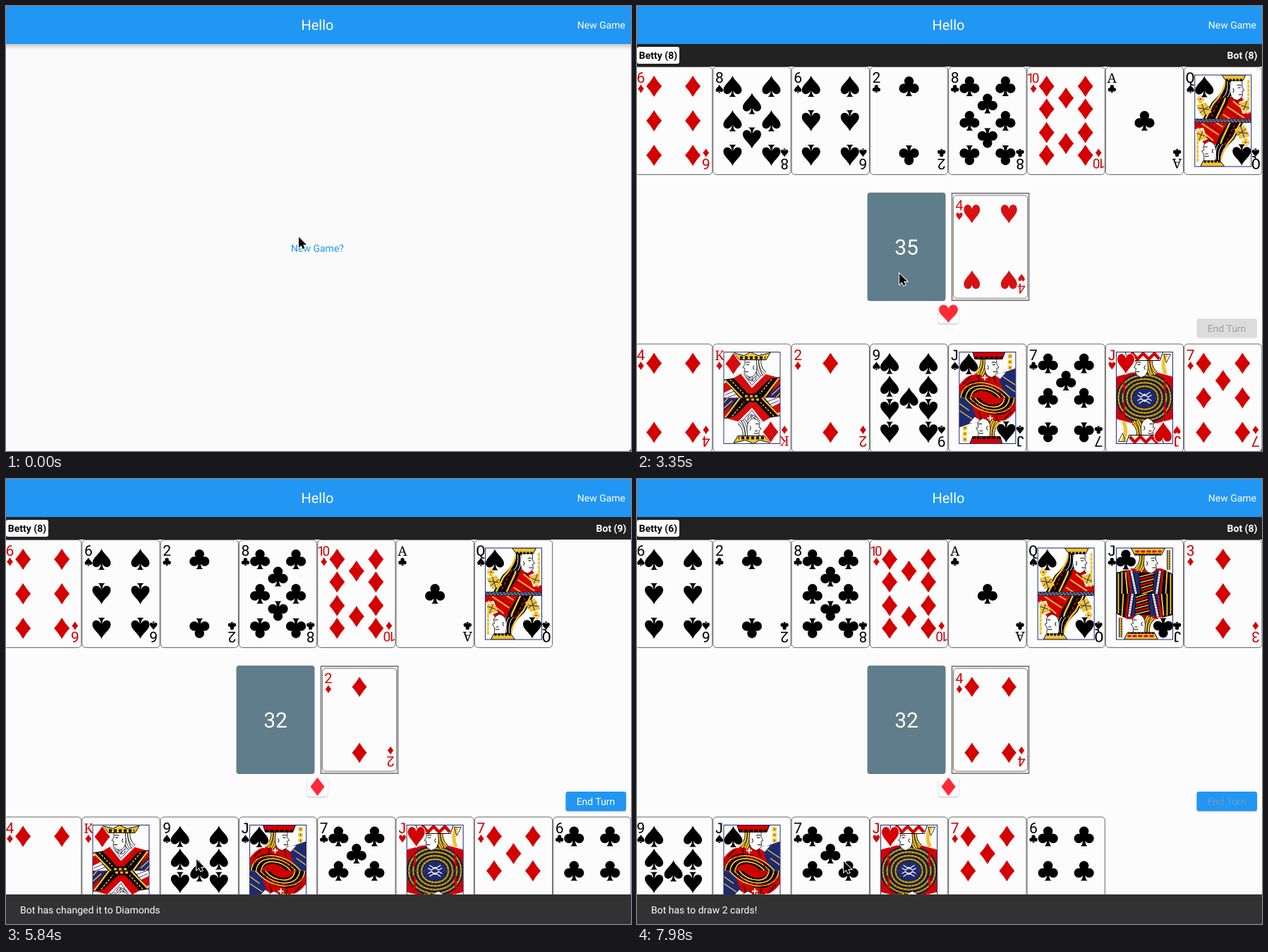
An HTML page with a canvas that plays this animation: 886 px wide and 632 px high, repeating every 8 s.

```html
<!DOCTYPE html>
<html lang="en">
<head>
<meta charset="utf-8">
<title>Card game</title>
<style>
html, body { margin: 0; width: 100%; height: 100%; overflow: hidden; background: #fafafa; }
canvas { display: block; }
</style>
</head>
<body>
<canvas id="stage" width="886" height="632"></canvas>
<script>
const ctx = document.getElementById('stage').getContext('2d');
ctx.textRendering = 'geometricPrecision';
const LOOP = 8000, STEP = 177.3;
const W = 111.3, H = 154;
const BLUE = '#2196f3', PAPER = '#fcfcfc';
const RED = '#d40000', GOLD = '#f2c230', OLIVE = '#94791c', NAVY = '#1d2a72';

const clamp = v => Math.max(0, Math.min(1, v));
const fill = (color, d) => { ctx.fillStyle = color; ctx.fill(new Path2D(d)); };
const line = (color, width, d, dash = []) => {
  ctx.strokeStyle = color;
  ctx.lineWidth = width;
  ctx.setLineDash(dash);
  ctx.stroke(new Path2D(d));
  ctx.setLineDash([]);
};
const band = (width, d, color = GOLD) => {
  line('#000', width + 2, d);
  line(color, width, d);
  line('#000', width - 2, d, [1.2, 2.6]);
};
const box = (color, x, y, w, h, r = 0) => {
  ctx.fillStyle = color;
  ctx.beginPath();
  ctx.roundRect(x, y, w, h, r);
  ctx.fill();
};
const raised = draw => {
  ctx.save();
  ctx.shadowColor = 'rgba(0,0,0,.25)';
  ctx.shadowBlur = 2;
  ctx.shadowOffsetY = 1;
  draw();
  ctx.restore();
};
const text = (s, x, y, size, color, align = 'left', weight = '400', family = 'Roboto, sans-serif') => {
  ctx.font = `${weight} ${size}px ${family}`;
  ctx.textAlign = align;
  ctx.fillStyle = color;
  ctx.fillText(s, x, y);
};
const place = (x, y, draw, sx = 1, sy = sx) => {
  ctx.save();
  ctx.translate(x, y);
  ctx.scale(sx, sy);
  draw();
  ctx.restore();
};

// Suits
const disc = (x, y) => `M${x - 6.7} ${y}a6.7 6.7 0 1 0 13.4 0a6.7 6.7 0 1 0-13.4 0Z`;
const suits = {
  D: 'M0-15Q5-6.5 11 0Q5 6.5 0 15Q-5 6.5-11 0Q-5-6.5 0-15Z',
  H: 'M0 14C-3 7-12 1-12-6C-12-16-1-16 0-7C1-16 12-16 12-6C12 1 3 7 0 14Z',
  S: 'M0-15C2-8 13-2 13 5C13 13 3 13 1 6C1 11 3 14 5 15H-5C-3 14-1 11-1 6C-3 13-13 13-13 5C-13-2-2-8 0-15Z',
  C: disc(0, -7.3) + disc(-7.4, 3) + disc(7.4, 3) +
     'M-2-4L-1.6 4C-1.6 10-3 13-5 14H5C3 13 1.6 10 1.6 4L2-4Z'
};
const inkOf = suit => 'DH'.includes(suit) ? RED : '#000';
const pip = (suit, x, y, scale = 1) => place(x, y, () => fill(inkOf(suit), suits[suit]), scale);

// Pip rows: 0 is the top row, 1 the bottom row
const sides = { 4: [0, 1], 6: [0, .5, 1], 7: [0, .5, 1], 8: [0, .5, 1], 9: [0, .33, .67, 1], 10: [0, .33, .67, 1] };
const middle = { A: [.5], 2: [0, 1], 3: [0, .5, 1], 7: [.25], 8: [.25, .75], 9: [.5], 10: [.17, .83] };

// Court figures: the upper half, with the card centre at 0,0
const head = (x, facing, hair) => place(x, 0, () => {
  for (const d of ['M-10-57Q-8-42-18-34', 'M-6-57Q-6-40-12-32']) {
    line('#000', 7, d);
    line(hair, 5.4, d);
    line('#000', .7, d);
  }
  const face = 'M-6-58H10V-48L13-43L10-42L11-36Q9-31 3-29Q-7-31-7-44Z';
  fill('#fff', face);
  line('#000', .8, face);
  line('#000', 1, 'M3-50Q6-52 9-50M4-47h4M5-37h5M-3-46q3 3 0 6');
}, facing, 1);
const hat = (color, d) => { fill(color, d); line('#000', 1, d); };

const figures = {
  KD() {
    fill(RED, 'M-40-20L-16-34H18L40-28V0H-40Z');
    fill('#fff', 'M-40-7L-24-15L-14 0H-40ZM-16-34L0-14L20-34Z');
    line(NAVY, .9, 'M-38-4L-24-10M-36 0L-20-6M-11-33L0-18L14-33M-5-33L0-25L7-33');
    fill('#000', 'M-40-26L-26-28L-4-4V0H-18ZM40-30L24-26L4-6V0H22Z');
    line(GOLD, 2.5, 'M-38-25L-14 0M38-28L17 0');
    line(GOLD, 1.5, 'M-31-26L-8-2M28-26L8-2', [3, 2]);
    fill(NAVY, 'M25-6L40-20V0H20Z');
    line(GOLD, 1.5, 'M28-4L40-15M34 0L40-7');
    head(0, -1, '#fff');
    line('#000', .8, 'M-8-30Q-6-25 0-24T6-31M-4-31v5M1-30v5');
    hat(GOLD, 'M-18-54L-26-64L-11-60L-2-65L9-60L26-64L20-54Z');
    line('#000', 4, 'M-17-57H19', [4, 3]);
    fill('#000', 'M-13-6H13V0H-13Z');
    line(GOLD, 3, 'M-10-2.5H11', [4, 3]);
  },
  JS() {
    fill(RED, 'M-40-18Q-28-36-8-35H20L34 0H-40Z');
    fill(NAVY, 'M14-33L40-42V0H26Z');
    line(GOLD, 1.5, 'M22-30L40-18M26-18L40-8');
    fill('#fff', 'M8-34L26-36L18-27Z');
    fill('#000', 'M-40 0Q-34-26-10-24Q14-22 30 0Z');
    for (const r of [36, 29, 22]) line(GOLD, 1.8, `M${-r - 2} 0Q${-r}${-r * .6} -8${-r * .6}Q${r * .4}${-r * .55} ${r - 4} 0`);
    fill(RED, 'M-24 0Q-18-11-6-10Q6-8 12 0Z');
    line('#fff', 2, 'M-4-33v8M-8-29h8');
    line('#000', 1.2, 'M-34-20L-24-30M-14-34L-12-25M8-33L12-20');
    line(RED, 2, 'M-34-10Q-24-22-8-20Q10-18 22-3', [5, 2]);
    head(3, 1, GOLD);
    hat(RED, 'M-18-55L-21-65H25L21-55Z');
    line('#000', 3, 'M-18-57H21', [5, 2]);
    line(GOLD, 6, 'M32-62V-38', [6, 2]);
    line('#000', 1, 'M32-60V-38', [2, 6]);
  },
  JH() {
    fill(RED, 'M-40-30L-18-36H18L40-30V0H-40Z');
    fill(NAVY, 'M-40 0C-40-48 40-48 40 0Z');
    for (const r of [37, 31, 25, 19]) {
      const arc = `M${-r} 0C${-r} ${-r * 1.15} ${r} ${-r * 1.15} ${r} 0`;
      line('#000', 4.5, arc);
      line(OLIVE, 3, arc);
      line(GOLD, 1, arc, [3, 2]);
    }
    fill(NAVY, 'M-15 0Q-12-12 0-12T15 0Z');
    line('#fff', 1.4, 'M-10-4L-5-1L0-5L5-1L10-4M-8-8L0-3L8-8');
    line(RED, 3, 'M-34-31Q-26-20-30-6M32-31Q26-20 30-6');
    head(-2, -1, GOLD);
    hat('#fff', 'M-24-53L-27-65H26L22-53Z');
    line(RED, 4.5, 'M-23-55L-17-63L-10-55L-2-63L6-55L14-63L21-55');
    line('#000', 1, 'M-24-53H22');
    line(GOLD, 5, 'M31-62Q23-48 30-34');
    line('#000', .8, 'M27-62H37L31-50Z');
  },
  JC() {
    fill(RED, 'M-40-30L-18-36H24L40-28V0H-40Z');
    fill('#000', 'M-40-30L-26-33L-20 0H-40ZM28-34L40-28V0H24Z');
    line(GOLD, 2, 'M-37-29V0M-32-31V0M-27-31L-24 0M37-28V0M32-32L30 0');
    fill(NAVY, 'M-22-34L-8-30L-4 0H-18ZM12-30L24-34L22 0H10Z');
    fill('#000', 'M-8-30L14-30L12 0H-6Z');
    line(GOLD, 1.8, 'M-7-24L13-29M-6-16L13-21M-5-8L12-13M-4 0L12-5');
    line(RED, 2.5, 'M-7-20L13-25M-6-12L12-17M-5-4L12-9');
    band(3, 'M-19-33L-12 0', '#fff');
    band(3, 'M22-33L17 0', '#fff');
    head(6, 1, GOLD);
    hat(GOLD, 'M-14-55L-19-65H29L24-55Z');
    line(RED, 3, 'M-13-60H24', [6, 2]);
    line('#000', 2, 'M-14-56H23', [4, 1]);
    band(2.5, 'M34-62V-34');
  },
  QS() {
    fill(RED, 'M-22 0L2-34H26L40-14V0Z');
    fill('#fff', 'M-40-26L-14-22L-22 0H-40ZM22-26L40-34V-12L28-10Z');
    fill('#000', 'M6-58Q0-40-16-26L-30 0H-8L8-28Q4-40 12-54Z');
    line(GOLD, 2.6, 'M4-57Q0-38-14-24L-26 0M9-52Q4-38 2-28L-11 0');
    line(RED, 2, 'M6-54Q0-36-8-24L-19 0', [4, 3]);
    line(GOLD, 2, 'M6-20L30-4M14-28L36-10M0-9L14 0');
    line('#000', 1, 'M4-17L28 0M18-28L38-13', [4, 2]);
    fill(GOLD, 'M-38-22L-24-26L-16-12L-30-6ZM24-25L36-30L38-16L28-14Z');
    line(NAVY, 1, 'M-36-18L-20-16M-33-11L-20-21M-30-24L-25-8M25-22L37-18M34-28L29-15');
    head(17, 1, '#000');
    line('#fff', 1, 'M6-56Q8-40 0-33M10-55Q12-40 6-33');
    hat(GOLD, 'M4-57L-2-65H32L28-57Z');
    line('#000', 3, 'M4-58H28', [3, 2]);
    line(GOLD, 5, 'M-32-36V-25M-37-31H-27');
    line(RED, 2, 'M-33-31h2');
    line(GOLD, 3, 'M36-58V-26', [5, 1]);
    line(NAVY, 4, 'M-40-1H40');
    line(GOLD, 1, 'M-40-1H40', [3, 2]);
  }
};

function court(name, suit) {
  for (const turn of [1, -1]) {
    place(W / 2, H / 2, () => {
      ctx.beginPath();
      ctx.rect(-40, -65, 80, 65.3);
      ctx.clip();
      figures[name]();
      ctx.translate(-26.5, -48.5);
      line('#fff', 2, suits[suit]);
      fill(inkOf(suit), suits[suit]);
    }, turn);
  }
  ctx.strokeStyle = NAVY;
  ctx.lineWidth = 1;
  ctx.strokeRect(W / 2 - 40, H / 2 - 65, 80, 130);
}

function cornerIndex(rank, suit) {
  const color = inkOf(suit);
  if ('JQ'.includes(rank)) text(rank, 9, 23, 22, color, 'center', '400', '"Liberation Mono", monospace');
  else if ('AK'.includes(rank)) text(rank, 9.5, 23, 19, color, 'center', '400', '"Noto Serif", serif');
  else if (rank === '10') {
    ctx.letterSpacing = '-3.5px';
    text(rank, 0, 23, 19, color);
    ctx.letterSpacing = '0px';
  } else text(rank, 9.5, 23, 21, color, 'center');
  pip(suit, 9.5, 31.5, .4);
}

function card(name, x, y, alpha = 1, scale = 1) {
  const rank = name.slice(0, -1), suit = name.at(-1);
  place(x, y, () => {
    ctx.globalAlpha = alpha;
    box(PAPER, .5, .5, W - 1, H - 1, 5);
    ctx.strokeStyle = '#666';
    ctx.lineWidth = 1;
    ctx.stroke();
    if (figures[name]) court(name, suit);
    const spread = suit === 'C' ? 25.5 : 27.5;
    const turned = t => t > .5 || name === '6S' && t === .5;
    const row = (dx, t) => pip(suit, W / 2 + dx, 28 + 98 * t, turned(t) ? -1 : 1);
    for (const t of sides[rank] || []) { row(-spread, t); row(spread, t); }
    for (const t of middle[rank] || []) row(0, t);
    cornerIndex(rank, suit);
    place(W, H, () => cornerIndex(rank, suit), -1);
  }, scale);
}

// Cards: name, step dealt, step played, step the fade-in starts
const player = [
  ['4D', 6, 44, 6.5], ['KD', 6, 34, 13.3], ['2D', 6, 33, 6.5], ['9S', 6, 99, 6.5], ['JS', 6, 99, 6.5],
  ['7C', 6, 99, 6.5], ['JH', 6, 99, 6.5], ['7D', 6, 99, 6.5], ['6C', 20, 99, 20]
];
const bot = [
  ...['6D', '8S', '6S', '2C', '8C', '10D', 'AC', 'QS'].map(c => [c, 11, { '6D': 42, '8S': 27 }[c] || 99, 10.7]),
  ['JC', 33, 99, 33], ['3D', 33, 99, 33]
];
const pile = [[13, '4H'], [27, '8S'], [33, '2D'], [34, 'KD'], [42, '6D'], [44, '4D']];
const deck = [[0, 44], [11, 35], [20, 34], [33, 32]];
const current = (list, n) => list.findLast(([from]) => n >= from)?.[1];

// Pointer: step, x, y
const pointer = [
  [0, 415, 328], [2, 425, 338], [4, 432, 349], [6, 432, 349], [8, 393, 423], [11, 350, 490], [14, 278, 531],
  [17, 300, 505], [19, 372, 380], [20, 372, 380], [22, 640, 440], [23, 810, 460], [24, 795, 516],
  [29, 461, 547], [32, 272, 540], [33, 270, 540], [34, 165, 540], [36, 800, 499], [37, 825, 458],
  [38, 825, 458], [42, 60, 542], [44, 70, 542], [45, 293, 543]
];

function drawPointer(n) {
  const i = Math.max(1, pointer.findIndex(([step]) => step >= n));
  const [s0, x0, y0] = pointer[i - 1], [s1, x1, y1] = pointer[i];
  const p = (n - s0) / (s1 - s0);
  place(x0 + (x1 - x0) * p, y0 + (y1 - y0) * p, () => {
    const arrow = 'M0 0V16L3.7 12.6L6.3 18L9 16.8L6.5 11.5H11.5Z';
    line('#fff', 2, arrow);
    fill('#000', arrow);
  }, .95);
}

function hand(cards, n, y) {
  const held = cards.filter(([, from, to]) => n >= from && n < to);
  held.forEach(([name, , , fade], i) => card(name, -4 + i * W, y, clamp((n - fade) / 6)));
  return held.length;
}

function nameTag(label, x, w, active) {
  if (active) box('#fff', x, 58, w, 24, 3);
  text(label, x + w / 2, 75, 14, active ? '#000' : '#fff', 'center', '700');
}

function suitSign(n) {
  if (n < 13) return;
  const loading = n < 16;
  raised(() => loading ? box(PAPER, 436, 427, 11, 23, 3) : box(PAPER, 427, 424, 29, 27, 4));
  if (loading) line('#f44336', 1, 'M437.5 429.5H445.5V444.5H437.5ZL445.5 444.5M445.5 429.5L437.5 444.5');
  else if (n < 27) place(441.5, 437, () => fill('#ff2a35', suits.H), 1.12, .92);
  else place(441.5, 437, () => fill('#ff2a35', 'M0-13L10 0L0 13L-10 0Z'));
}

function endTurn(n) {
  const fading = n >= 13 && n < 15 || n >= 42;
  const off = n >= 15 && n < 20 || n >= 27 && n < 31;
  const button = () => box(off ? '#dcdcdc' : BLUE, 793.5, 444, 85.5, 27.5, 3);
  off ? button() : raised(button);
  text('End Turn', 836, 463, 14, off ? '#a0a0a0' : fading ? '#6d9cc4' : '#fff', 'center');
}

function snackbar(n) {
  const second = n >= 44;
  const shown = second ? (n - 43) / 2 : Math.min((n - 26) / 2, (43 - n) / 2);
  if (shown <= 0) return;
  const y = 632 - 42 * clamp(shown * 2);
  box('#323232', 0, y, 886, 42);
  text(second ? 'Bot has to draw 2 cards!' : 'Bot has changed it to Diamonds', 20, y + 27, 14, '#fff');
}

function startScreen(n) {
  const shade = ctx.createLinearGradient(0, 54, 0, 62);
  shade.addColorStop(0, 'rgba(0,0,0,.2)');
  shade.addColorStop(1, 'rgba(0,0,0,0)');
  box(shade, 0, 54, 886, 8);
  if (n > 0) box(`rgba(33,150,243,${n < 4 ? .06 : .14})`, 397, 329, 89, 30, 3);
  text('New Game?', 441.5, 349, 14, BLUE, 'center');
}

function game(n) {
  const botsTurn = n >= 23 && n < 27 || n >= 38 && n < 42;
  const y = n < 11 ? 283 : 265;
  box('#212121', 0, 54, 886, 32);
  const botCount = hand(bot, n, 86);
  const playerCount = hand(player, n, 479.5);
  nameTag(`Betty (${playerCount})`, 0, 60, !botsTurn);
  nameTag(`Bot (${botCount})`, 833, 50, botsTurn);

  box('#607d8b', 326.5, y, 111, H, 4);
  text(current(deck, n), 382, y + 88, 30, '#fff', 'center');
  ctx.strokeStyle = '#8a8a8a';
  ctx.lineWidth = 2;
  ctx.strokeRect(446.5, y + 1, 109, H - 2);
  const top = current(pile, n);
  if (top) card(top, 447.9, y + 3.5, clamp((n - 13.4) / 6), .955);
  suitSign(n);
  if (!botsTurn) endTurn(n);
  snackbar(n);
}

function frame(now) {
  const n = Math.floor((now % LOOP + 20) / STEP);
  box(n < 6 ? '#fafafa' : PAPER, 0, 0, 886, 632);
  box(BLUE, 0, 0, 886, 54);
  text('Hello', 441.5, 34, 20, '#fff', 'center');
  text('New Game', 878, 32, 14, '#fff', 'right');
  if (n < 6) startScreen(n);
  else game(n);
  drawPointer(n);
  fill('#444', 'M886 629V632H883Z');
}

const start = performance.now();
(function tick() {
  frame(performance.now() - start);
  requestAnimationFrame(tick);
})();
</script>
</body>
</html>
```
